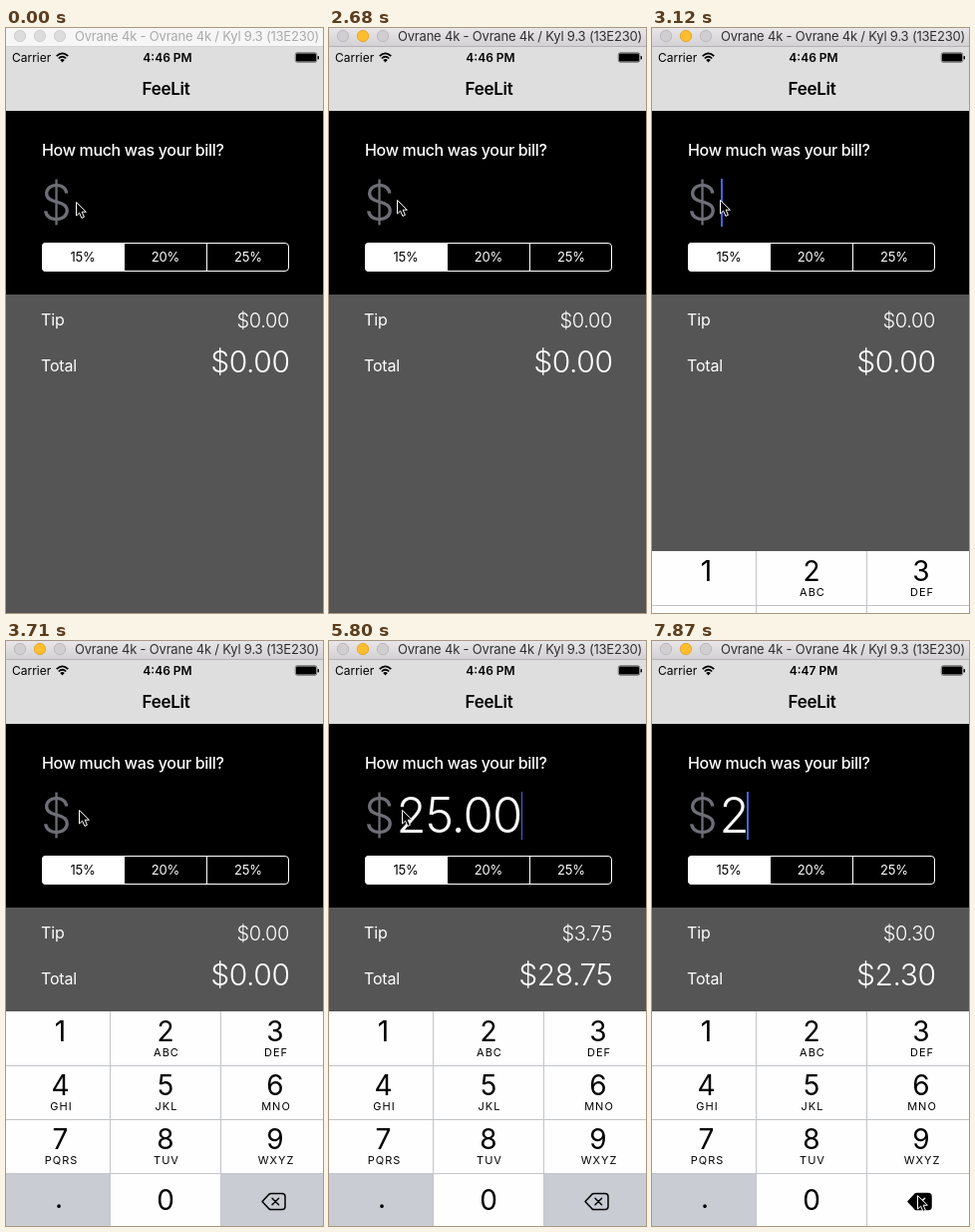
An HTML page for the animation above (8 s loop, 318 by 586 pixels).

```html
<!DOCTYPE html>
<html lang="en">
<head>
<meta charset="utf-8">
<title>Tip calculator</title>
<style>
  html, body { margin: 0; width: 100%; height: 100%; overflow: hidden; background: #555; }
  svg { display: block; width: 318px; height: 586px; font-family: Inter, Roboto, sans-serif; fill: #fff; }
  .dark { fill: #000; }
  .mid { text-anchor: middle; }
  .end { text-anchor: end; }
  .light { font-weight: 300; }
  .title { font-size: 13px; letter-spacing: -.2px; }
  .status { font-size: 12px; }
  .nav { font-size: 17px; font-weight: 600; letter-spacing: -.3px; }
  .body { font-size: 16px; letter-spacing: -.15px; }
  .prompt { font-size: 16px; font-weight: 500; letter-spacing: -.33px; }
  .seg { font-size: 13px; letter-spacing: -.2px; }
  .big { font-size: 49px; letter-spacing: -.9px; }
  .tip { font-size: 20px; font-weight: 350; letter-spacing: -.35px; }
  .total { font-size: 30px; letter-spacing: -.45px; }
  .digit { font-size: 28px; }
  .letters { font-size: 11px; letter-spacing: 1px; }
</style>
</head>
<body>
<svg viewBox="0 0 318 586">
  <defs>
    <linearGradient id="chrome" x2="0" y2="1">
      <stop stop-color="#e8e6e8"/><stop offset="1" stop-color="#d3d1d3"/>
    </linearGradient>
  </defs>
  <rect width="318" height="586" fill="#555"/>
  <rect y="83" width="318" height="184" fill="#000"/>
  <rect y="18" width="318" height="65" fill="#dedede"/>

  <rect id="bar" width="318" height="18"/>
  <g id="lights" stroke-width=".8">
    <circle cx="14" cy="8" r="5.7"/><circle cx="34" cy="8" r="5.7"/><circle cx="54" cy="8" r="5.7"/>
  </g>
  <path id="edge" d="M0 18.5H318"/>
  <text id="caption" class="title" x="69" y="13">Ovrane 4k - Ovrane 4k / Kyl 9.3 (13E230)</text>

  <g class="dark">
    <text class="status" x="6" y="34">Carrier</text>
    <g fill="none" stroke="#000" stroke-width="1.7">
      <path d="M50.7 28.2Q56.5 22.6 62.3 28.2M52.8 30.5Q56.5 27 60.2 30.5"/>
    </g>
    <path d="M54.2 32Q56.5 30 58.8 32L56.5 34.4Z"/>
    <text id="clock" class="status mid" x="162" y="34" font-weight="600"></text>
    <rect x="290.25" y="24.75" width="21.5" height="9.5" rx="2" fill="none" stroke="#000" stroke-width=".5"/>
    <rect x="291" y="25.5" width="20" height="8" rx="1.2"/>
    <rect x="312.5" y="28" width="1.5" height="3.4" rx=".7"/>
    <text class="nav mid" x="160.5" y="67">FeeLit</text>
  </g>

  <text class="prompt" x="36" y="128">How much was your bill?</text>
  <text class="big light" x="35" y="192" fill="#6e6e76">$</text>
  <text id="bill" class="big light" x="67.5" y="192"></text>
  <rect id="caret" y="151" height="48" fill="#4263e0"/>

  <rect x="36.5" y="215.5" width="247" height="28" rx="3.5" fill="none" stroke="#fff"/>
  <path d="M119 215V244H40a4 4 0 0 1-4-4V219a4 4 0 0 1 4-4Z"/>
  <path d="M201.5 216V243" stroke="#fff"/>
  <g class="seg mid">
    <text class="dark" x="77" y="234">15%</text>
    <text x="160" y="234">20%</text>
    <text x="243" y="234">25%</text>
  </g>

  <text class="body" x="35" y="298">Tip</text>
  <text class="body" x="35" y="344">Total</text>
  <text id="tip" class="tip end" x="284" y="300"></text>
  <text id="total" class="total light end" x="284.5" y="345"></text>

  <g id="pad">
    <rect y="371" width="318" height="215" fill="#fefefe"/>
    <rect y="533" width="104" height="53" fill="#c9ccd3"/>
    <rect id="eraseKey" x="216" y="533" width="102" height="53"/>
    <path d="M0 425.5H318M0 479.5H318M0 533.5H318M104.5 371V586M215.5 371V586" stroke="#c3c5c9"/>
    <g id="keys" class="dark mid"></g>
    <path id="eraseBody" d="M257 561.5L263.6 554.4Q264.6 553.4 266 553.4H277Q280 553.4 280 556.4V566.6Q280 569.6 277 569.6H266Q264.6 569.6 263.6 568.6Z" stroke="#000" stroke-width="1.5" stroke-linejoin="round"/>
    <path id="eraseCross" d="M267 558.2L273.6 564.8M273.6 558.2L267 564.8" stroke-width="1.5" stroke-linecap="round"/>
  </g>
  <path id="cursor" d="M.5 .5V14L3.6 11.2L5.9 16.4L8.4 15.3L6.2 10.2H10.4Z" fill="#000" stroke="#fff"/>
</svg>
<script>
  const LOOP = 8000;
  const el = Object.fromEntries([...document.querySelectorAll('[id]')].map(n => [n.id, n]));
  const set = (node, attrs) => Object.entries(attrs).forEach(([k, v]) => node.setAttribute(k, v));

  // Latest value whose start time has passed.
  const at = (track, t) => track.reduce((value, [start, next]) => t >= start ? next : value, track[0][1]);

  // Index of the held step: -1 before the span, count - 1 from its end on.
  const stepOf = (t, start, end, count) =>
    t < start ? -1 : Math.min(count - 1, Math.floor((t - start) / (end - start) * (count - 1) + 1e-6));

  const bills = [[0, ''], [4160, '2'], [4310, '25'], [5210, '25.'], [5510, '25.0'], [5800, '25.00'],
    [7430, '25.0'], [7580, '25.'], [7730, '25'], [7870, '2']];
  const caretX = [69, 95, 123, 135, 164, 193];
  const caretAlpha = [[0, 0], [2980, 1], [3420, .5], [3560, 0], [4010, 1], [4910, .4], [5060, 0],
    [5210, 1], [6250, .4], [6400, 0], [6840, 1], [7280, .4], [7430, 1]];
  const pointer = [[0, [70, 174]], [750, [68, 174]], [890, [66, 174]], [1940, [65, 174]], [2680, [68, 172]],
    [3130, [70, 171]], [3270, [73, 169]]];

  const letters = ['', 'ABC', 'DEF', 'GHI', 'JKL', 'MNO', 'PQRS', 'TUV', 'WXYZ'];
  const columns = [54.5, 160, 270];
  const label = (cls, x, y, text) => `<text class="${cls}" x="${x}" y="${y}">${text}</text>`;
  el.keys.innerHTML = letters.map((abc, i) => {
    const x = columns[i % 3], y = 401 + 54 * Math.floor(i / 3);
    return label('digit', x, y, i + 1) + label('letters', x + 1, y + 15, abc);
  }).join('') + label('digit', 160, 570, '0') + label('digit', 53, 568, '.');

  function cursorAt(t) {
    const step = stepOf(t, 6250, 7280, 8);
    if (step < 0) return at(pointer, t);
    const p = (step + 1) / 8, ease = p * p * (3 - 2 * p);
    return [73 + 193 * ease, 169 + 386 * ease];
  }

  function padOffset(t) {
    const step = stepOf(t, 2980, 3710, 6);
    return step < 0 ? 215 : Math.round(153 * Math.exp(-1.5 * step));
  }

  function draw(t) {
    const active = t >= 2230, pressed = t >= 7430;
    set(el.bar, { fill: active ? 'url(#chrome)' : '#f6f6f6' });
    set(el.edge, { stroke: active ? '#b5b3b5' : '#d4d4d4' });
    set(el.caption, { fill: active ? '#303030' : '#aaa' });
    [...el.lights.children].forEach((dot, i) => {
      const lit = active && i === 1;
      set(dot, { fill: lit ? '#fdbd2e' : active ? '#d0ced0' : '#dcdcdc', stroke: lit ? '#dfa023' : active ? '#b4b2b4' : '#cbcbcb' });
    });
    el.clock.textContent = t < 6840 ? '4:46 PM' : '4:47 PM';

    const bill = at(bills, t), amount = Number(bill);
    el.bill.textContent = bill;
    el.tip.textContent = '$' + (amount * .15).toFixed(2);
    el.total.textContent = '$' + (amount * 1.15).toFixed(2);
    // The field clips the caret at its right edge when full.
    set(el.caret, { x: caretX[bill.length], width: bill.length === 5 ? 1 : 2, opacity: at(caretAlpha, t) });

    set(el.pad, { transform: `translate(0 ${padOffset(t)})` });
    set(el.eraseKey, { fill: pressed ? '#fefefe' : '#c9ccd3' });
    set(el.eraseBody, { fill: pressed ? '#000' : 'none' });
    set(el.eraseCross, { stroke: pressed ? '#fff' : '#000' });
    set(el.cursor, { transform: `translate(${cursorAt(t)})` });
  }

  const begin = performance.now();
  function tick() {
    draw((performance.now() - begin) % LOOP);
    requestAnimationFrame(tick);
  }
  tick();
</script>
</body>
</html>
```
